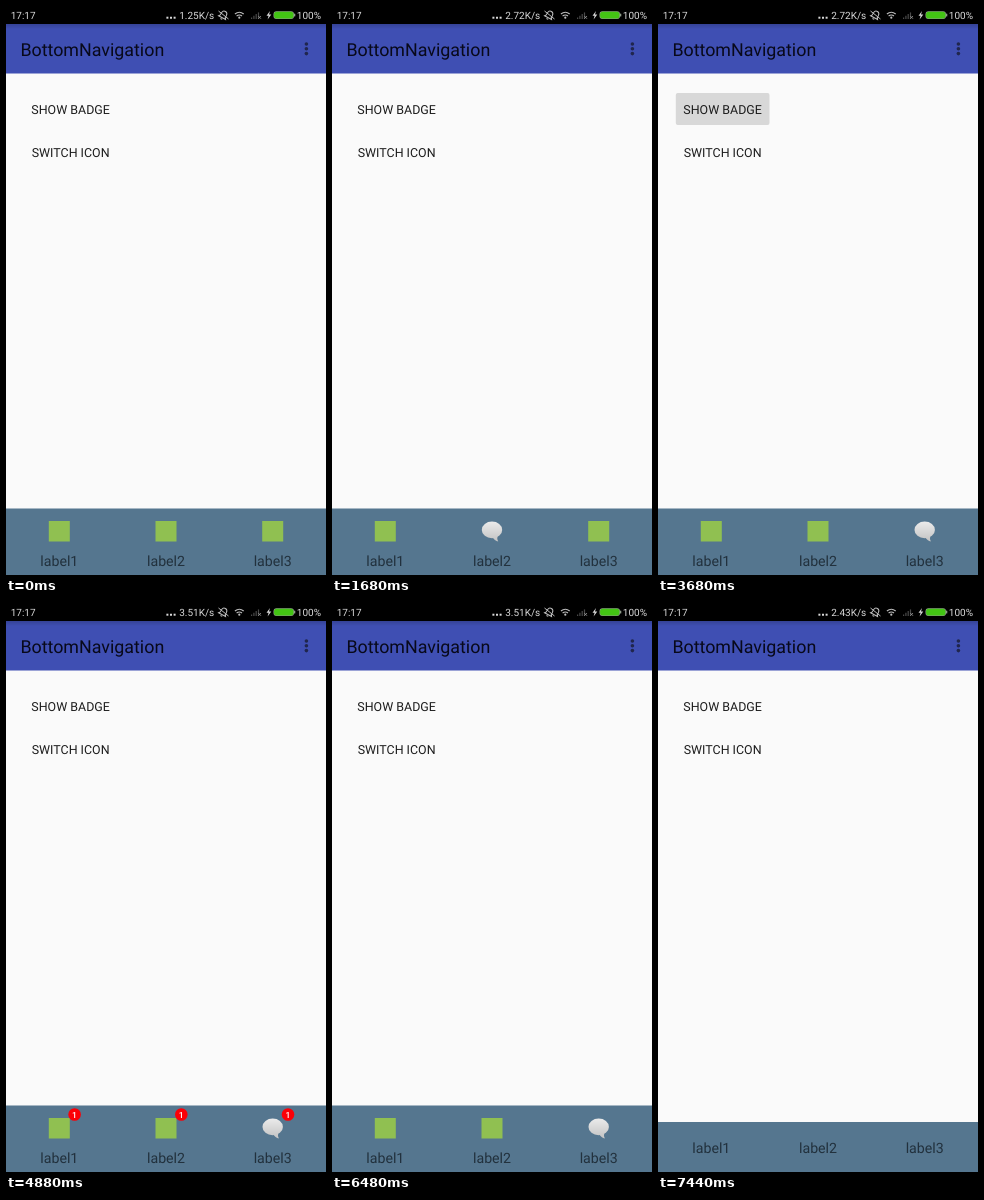
Animation of 320 by 569 pixels, one loop 8000 ms. Source, as an HTML page with a canvas:

```html
<!DOCTYPE html>
<html lang="en">
<head>
<meta charset="utf-8">
<title>Bottom navigation demo</title>
<style>
html, body { margin: 0; width: 100%; height: 100%; overflow: hidden; background: #fafafa; }
canvas { display: block; width: 320px; height: 569px; }
</style>
</head>
<body>
<canvas id="stage"></canvas>
<script>
const W = 320, H = 569, LOOP = 8000, STEP = 80;
const canvas = document.getElementById('stage');
const ctx = canvas.getContext('2d');
const dpr = window.devicePixelRatio || 1;
canvas.width = W * dpr;
canvas.height = H * dpr;
ctx.textRendering = 'geometricPrecision';

const TABS = [53.3, 160, 266.7];
const FONT = 'Roboto, "Noto Sans", sans-serif';

// [start time, value]: each value holds until the next entry
const SPEED = [[0, '1.25'], [1440, '2.72'], [4880, '3.51'], [7440, '2.43']];
const ACTIVE = [[0, -1], [1440, 0], [1680, 1], [2080, 2], [4960, 0], [5440, 1], [6160, 2]];
const BADGE_IN = 3760;
const BADGE_OUT = [4960, 5520, 6080];

const clamp = v => Math.max(0, Math.min(1, v));
const valueAt = (track, t) => track.filter(k => k[0] <= t).pop()[1];
const between = (t, a, b) => t >= a && t < b;

function text(str, x, y, size, color, align = 'left', weight = 400) {
  ctx.font = `${weight} ${size}px ${FONT}`;
  ctx.textAlign = align;
  ctx.fillStyle = color;
  ctx.fillText(str, x, y);
}

function rect(x, y, w, h, color, r = 0) {
  ctx.fillStyle = color;
  ctx.beginPath();
  ctx.roundRect(x, y, w, h, r);
  ctx.fill();
}

function dot(x, y, r, color) {
  ctx.fillStyle = color;
  ctx.beginPath();
  ctx.arc(x, y, r, 0, Math.PI * 2);
  ctx.fill();
}

function path(d, color, stroke) {
  const p = new Path2D(d);
  if (stroke) {
    ctx.lineWidth = stroke;
    ctx.strokeStyle = color;
    ctx.stroke(p);
  } else {
    ctx.fillStyle = color;
    ctx.fill(p);
  }
}

function fade(y, h, from, to) {
  const g = ctx.createLinearGradient(0, y, 0, y + h);
  g.addColorStop(0, from);
  g.addColorStop(1, to);
  return g;
}

function statusBar(t) {
  const ink = '#d8d8d8', dim = '#bdbdbd';
  rect(0, 0, W, 18, '#000');
  text('17:17', 4.7, 13, 10, ink);
  for (let i = 0; i < 3; i++) rect(160.4 + i * 3.6, 10.7, 2, 2, ink);
  text(valueAt(SPEED, t) + 'K/s', 208.2, 13, 10, ink, 'right');

  // tilted, muted bell
  ctx.save();
  ctx.translate(217.5, 9);
  ctx.rotate(0.5);
  path('M-4 3 L-2.8 1.5 V-1 Q-2.6 -4 0 -4 Q2.6 -4 2.8 -1 V1.5 L4 3 Z M-1 4.5 H1', dim, 1);
  ctx.restore();
  path('M212.5 5 L222.5 13', dim, 1);

  // wifi
  path('M228.9 8 Q233.3 4.4 237.7 8 M230.6 10 Q233.3 7.9 236 10', dim, 1.1);
  dot(233.3, 11.7, 1.1, dim);

  // weak signal
  for (let i = 0; i < 4; i++) rect(245 + i * 2.3, 11.5 - i * 1.7, 1.2, 1.5 + i * 1.7, '#4a4a4a');
  path('M252.3 10 L255 12.8 M255 10 L252.3 12.8', '#999', 0.8);

  // charging battery
  path('M264 5 L260.5 9.7 H262.6 L261.6 13.5 L265.3 8.5 H263 Z', ink);
  rect(267.5, 5.2, 20.5, 7.8, '#8f9c8a', 3);
  rect(268.1, 5.8, 19.3, 6.6, '#43c414', 2.5);
  rect(288, 7.5, 1.3, 3, '#8f9c8a', 0.6);
  text('100%', 315, 13, 10, ink, 'right');
}

function appBar() {
  rect(0, 18, W, 49.6, '#3f4fb3');
  rect(0, 18, W, 5, fade(18, 5, 'rgba(0,0,0,.16)', 'rgba(0,0,0,0)'));
  text('BottomNavigation', 14.4, 49.8, 17.85, '#08091a');
  for (const y of [38, 42.8, 47.6]) dot(300.4, y, 1.8, '#20264d');
}

function button(label, y, pressed) {
  if (pressed) rect(17.8, y - 16, 93.7, 32, '#d8d8d8', 2);
  text(label, 64.6, y + 4.5, 12.44, '#1c1c1c', 'center');
}

function bubble(x) {
  ctx.fillStyle = fade(515, 21, '#ececec', '#c2c2c2');
  ctx.beginPath();
  ctx.ellipse(x, 523.9, 10.2, 8.3, 0, 0, Math.PI * 2);
  ctx.fill();
  ctx.beginPath();
  ctx.moveTo(x + 0.5, 531);
  ctx.quadraticCurveTo(x + 2.5, 534.8, x + 6.2, 535.6);
  ctx.quadraticCurveTo(x + 4.6, 533.2, x + 5.6, 530);
  ctx.fill();
}

function badge(x, scale) {
  if (scale <= 0) return;
  ctx.save();
  ctx.translate(x + 15.3, 511.5);
  ctx.scale(scale, scale);
  dot(0, 0, 6.3, '#fb0007');
  text('1', -0.2, 3, 8.5, '#fff', 'center', 500);
  ctx.restore();
}

function labels(baseline) {
  TABS.forEach((x, i) => text('label' + (i + 1), x, baseline, 14.2, '#22313d', 'center'));
}

function iconBar(t) {
  const active = valueAt(ACTIVE, t);
  rect(0, 502.4, W, 66.6, '#55768f');
  TABS.forEach((x, i) => {
    if (i === active) bubble(x);
    else rect(x - 10.5, 515, 21, 20.5, '#90c051');
    const shown = clamp((t - BADGE_IN) / 480);
    const hidden = clamp((t - BADGE_OUT[i]) / 400);
    badge(x, shown * (1 - hidden));
  });
  labels(560.2);
}

function textBar() {
  rect(0, 519, W, 50, '#55768f');
  labels(549.5);
}

function draw(t) {
  ctx.setTransform(dpr, 0, 0, dpr, 0, 0);
  rect(0, 0, W, H, '#fafafa');
  statusBar(t);
  appBar();
  button('SHOW BADGE', 103, between(t, 3680, 3840));
  button('SWITCH ICON', 146, between(t, 1040, 1440));

  const swap = clamp((t - 7120) / 320);
  if (swap < 1) iconBar(t);
  if (swap > 0) {
    ctx.globalAlpha = swap;
    rect(0, 500, W, 69, '#fafafa');
    textBar();
    ctx.globalAlpha = 1;
  }
}

const start = performance.now();
function tick() {
  const t = (performance.now() - start) % LOOP;
  draw(Math.floor(t / STEP) * STEP);
  requestAnimationFrame(tick);
}
tick();
</script>
</body>
</html>
```
